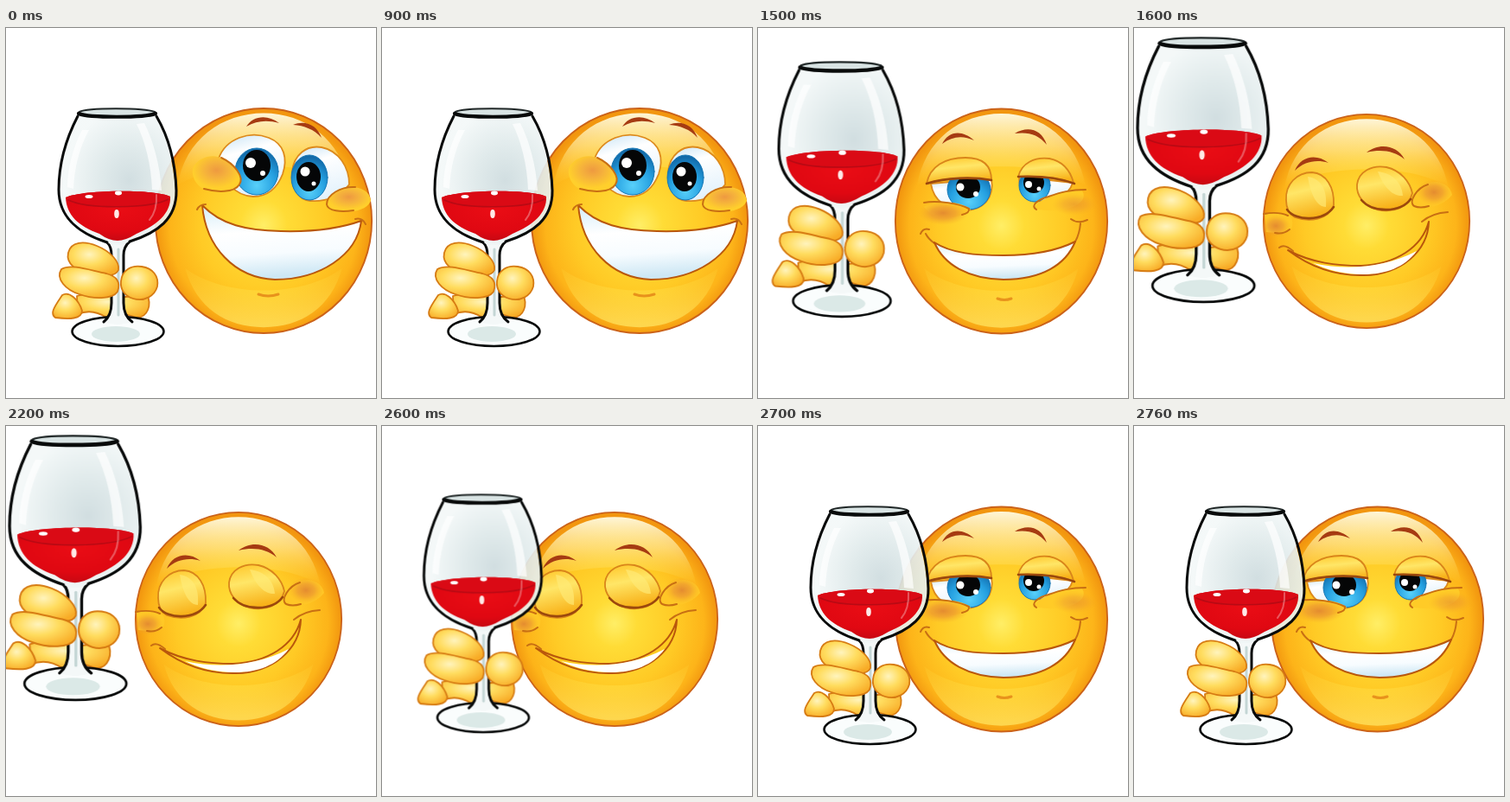
Animation, 428 px wide and 428 px high, one loop 2800 ms. Source, as an HTML page:

```html
<!DOCTYPE html>
<html lang="en">
<head>
<meta charset="utf-8">
<title>Cheers</title>
<style>
  html, body { margin: 0; width: 100%; height: 100%; overflow: hidden; background: #fff; }
  svg { display: block; width: 100%; height: 100%; }
  path, ellipse { stroke-linecap: round; stroke-linejoin: round; }

  .brow { fill: #a63b12; }
  .eye { fill: url(#eyeWhite); stroke: #dd8a1c; stroke-width: 1.8; }
  .iris { fill: url(#iris); stroke: #1677b5; stroke-width: 1; }
  .pupil { fill: #050607; }
  .shine { fill: #fff; }
  .lid { fill: url(#lid); stroke: #d9851a; stroke-width: 1.8; }
  .lash { fill: none; stroke: #9b480d; stroke-width: 2.6; }
  .cheek { fill: url(#cheek); }
  .blush { fill: url(#blush); }
  .crease { fill: none; stroke: #c86f13; stroke-width: 2; }
  .smile { fill: url(#teeth); stroke: #b9570c; stroke-width: 2; }
  .chin { fill: none; stroke: #e8921c; stroke-width: 3; }
  .finger { fill: url(#finger); stroke: #d67b13; stroke-width: 1.8; }
  .ink { fill: none; stroke: #080a0a; stroke-width: 3; }

  #glass, .face { animation: 2.8s step-end infinite; }
  #glass { animation-name: toast; }
  .face { visibility: hidden; }
  #awake { animation-name: awake; }
  #sleepy { animation-name: sleepy; }
  #content { animation-name: content; }

  @keyframes toast {
    0% { transform: none; }
    53.5714% { transform: translate(-40.9px, -60.6px) scale(1.065, 1.072); }
    57.1428% { transform: translate(-63.7px, -92.3px) scale(1.112); }
    92.8571% { transform: translate(-12.5px, -13.8px); }
    96.4285%, 100% { transform: none; }
  }
  @keyframes awake {
    0% { visibility: visible; }
    53.5714%, 100% { visibility: hidden; }
  }
  @keyframes sleepy {
    0% { visibility: hidden; }
    53.5714% { visibility: visible; }
    57.1428% { visibility: hidden; }
    96.4285%, 100% { visibility: visible; }
  }
  @keyframes content {
    0% { visibility: hidden; }
    57.1428% { visibility: visible; }
    96.4285%, 100% { visibility: hidden; }
  }
</style>
</head>
<body>
<svg viewBox="0 0 428 428">
  <defs>
    <radialGradient id="skin" cx=".5" cy=".52" r=".5">
      <stop offset="0" stop-color="#ffee66"/>
      <stop offset=".22" stop-color="#ffdc36"/>
      <stop offset=".6" stop-color="#ffca25"/>
      <stop offset=".87" stop-color="#fdb419"/>
      <stop offset="1" stop-color="#f2960f"/>
    </radialGradient>
    <linearGradient id="gloss" x2="0" y2="1">
      <stop offset="0" stop-color="#fffbe2" stop-opacity=".95"/>
      <stop offset=".45" stop-color="#fff0a8" stop-opacity=".6"/>
      <stop offset="1" stop-color="#ffe14d" stop-opacity="0"/>
    </linearGradient>
    <linearGradient id="glow" x2="0" y2="1">
      <stop offset="0" stop-color="#ffe548" stop-opacity=".1"/>
      <stop offset="1" stop-color="#ffe968" stop-opacity=".7"/>
    </linearGradient>
    <linearGradient id="eyeWhite" x2=".3" y2="1">
      <stop offset="0" stop-color="#c5e2f5"/>
      <stop offset=".35" stop-color="#fff"/>
      <stop offset="1" stop-color="#e4f2fc"/>
    </linearGradient>
    <radialGradient id="iris" cy=".8" r=".75">
      <stop offset="0" stop-color="#58d0fa"/>
      <stop offset=".6" stop-color="#249fe0"/>
      <stop offset="1" stop-color="#126aa9"/>
    </radialGradient>
    <linearGradient id="lid" x2=".25" y2="1">
      <stop offset="0" stop-color="#ffc425"/>
      <stop offset=".45" stop-color="#ffe667"/>
      <stop offset="1" stop-color="#f8b21a"/>
    </linearGradient>
    <radialGradient id="cheek" cy=".4">
      <stop offset="0" stop-color="#ee9a40"/>
      <stop offset=".45" stop-color="#f5b13c"/>
      <stop offset="1" stop-color="#ffcf2c"/>
    </radialGradient>
    <radialGradient id="blush">
      <stop offset="0" stop-color="#df8131" stop-opacity=".85"/>
      <stop offset=".5" stop-color="#e99032" stop-opacity=".6"/>
      <stop offset="1" stop-color="#f5a825" stop-opacity="0"/>
    </radialGradient>
    <linearGradient id="teeth" x2=".15" y2="1">
      <stop offset="0" stop-color="#d5edf8"/>
      <stop offset=".4" stop-color="#fff"/>
      <stop offset=".7" stop-color="#f7fcff"/>
      <stop offset="1" stop-color="#cde7f4"/>
    </linearGradient>
    <radialGradient id="finger" cx=".42" cy=".36" r=".7">
      <stop offset="0" stop-color="#fff4bd"/>
      <stop offset=".45" stop-color="#ffdc5e"/>
      <stop offset="1" stop-color="#f8ab26"/>
    </radialGradient>
    <radialGradient id="crystal" cx=".6" cy=".5" r=".55">
      <stop offset="0" stop-color="#cddbde"/>
      <stop offset=".45" stop-color="#dde8e9"/>
      <stop offset="1" stop-color="#f3f8f8"/>
    </radialGradient>
    <radialGradient id="wine" cx=".5" cy=".35" r=".65">
      <stop offset="0" stop-color="#ea0d15"/>
      <stop offset=".7" stop-color="#e00812"/>
      <stop offset="1" stop-color="#c80813"/>
    </radialGradient>

    <g id="head">
      <ellipse rx="99.3" ry="99.3" fill="url(#skin)" stroke="#cb6219" stroke-width="1.5"/>
      <path d="M-79 -31C-72 -72-38 -95 0 -95C38 -95 71 -72 79 -31C48 -54-45 -54-79 -31Z" fill="url(#gloss)"/>
      <path d="M-72 42C-35 68 35 68 72 42C62 77 34 94 0 94C-34 94-62 77-72 42Z" fill="url(#glow)"/>
    </g>
  </defs>

  <g id="awake" class="face">
    <use href="#head" transform="translate(298 223) scale(1.26 1.31)"/>
    <path class="brow" d="M278 114C285 102 302 99 316 110C302 106 290 107 278 114Z"/>
    <path class="brow" d="M332 112C347 106 360 113 365 127C356 117 345 113 332 112Z"/>
    <path class="eye" d="M246 151C254 128 282 118 304 127C322 134 326 151 320 169C313 187 302 195 286 195C264 194 250 176 246 151Z"/>
    <path class="eye" d="M331 166C333 147 347 135 365 138C385 142 397 161 397 181C386 195 370 201 352 200C337 199 330 184 331 166Z"/>
    <ellipse class="iris" cx="290" cy="166" rx="25" ry="27"/>
    <ellipse class="pupil" cx="290" cy="159" rx="16" ry="18"/>
    <circle class="shine" cx="283" cy="156" r="6"/>
    <circle class="shine" cx="297" cy="168" r="3"/>
    <ellipse class="iris" cx="351" cy="173" rx="21" ry="26"/>
    <ellipse class="pupil" cx="350" cy="172" rx="14" ry="17"/>
    <circle class="shine" cx="346" cy="166" r="5.5"/>
    <circle class="shine" cx="356" cy="180" r="2.5"/>
    <path class="cheek" d="M217 160C225 148 241 145 252 152C265 160 275 172 270 181C264 191 239 191 225 184C217 178 214 168 217 160Z"/>
    <path class="crease" d="M249 150C264 157 276 172 270 181C264 191 243 190 229 186"/>
    <path class="cheek" d="M371 205C372 194 383 185 399 184C411 184 421 189 422 200C417 212 397 214 384 212C376 211 371 209 371 205Z"/>
    <path class="crease" d="M404 184C387 183 371 193 371 204C372 212 388 213 402 211"/>
    <path class="smile" d="M227 205C249 228 278 234 318 235C355 236 386 232 411 223C406 263 363 291 311 291C264 289 231 253 227 205Z"/>
    <path class="crease" d="M221 210Q224 204 231 204M404 221Q412 219 416 227"/>
    <path class="chin" d="M292 308Q303 312 315 308"/>
  </g>

  <g id="sleepy" class="face">
    <use href="#head" transform="translate(281.5 223.5) scale(1.235 1.31)"/>
    <path class="brow" d="M213 134C220 119 236 117 250 130C237 124 225 125 213 134Z"/>
    <path class="brow" d="M297 122C312 113 328 117 334 135C324 123 313 120 297 122Z"/>
    <path class="eye" d="M200 180L270 174C274 197 260 211 239 211C219 211 203 200 200 180Z"/>
    <path class="eye" d="M302 172L364 179C360 194 340 202 321 200C307 198 302 187 302 172Z"/>
    <ellipse class="iris" cx="244" cy="187" rx="25" ry="23"/>
    <ellipse class="pupil" cx="243" cy="184" rx="14" ry="13"/>
    <circle class="shine" cx="234" cy="184" r="4.5"/>
    <circle class="shine" cx="252" cy="192" r="3"/>
    <ellipse class="iris" cx="320" cy="182" rx="18" ry="19"/>
    <ellipse class="pupil" cx="319" cy="179" rx="12" ry="12"/>
    <circle class="shine" cx="313" cy="181" r="4"/>
    <circle class="shine" cx="325" cy="186" r="2.5"/>
    <path class="lid" d="M195 180C199 160 216 150 240 150C260 150 270 159 270 176C248 172 218 173 195 180Z"/>
    <path class="lid" d="M301 172C305 156 320 149 337 151C352 154 361 164 365 179C345 173 323 171 301 172Z"/>
    <path class="lash" d="M195 180C218 173 248 172 270 176M301 172C325 171 350 174 366 180"/>
    <path fill="#ffc926" d="M192 207C207 198 237 201 246 210C238 220 205 226 192 207Z"/>
    <ellipse class="blush" cx="214" cy="214" rx="29" ry="14"/>
    <path class="crease" d="M192 202C207 199 233 203 244 209Q245 214 236 216"/>
    <path fill="#ffcb27" d="M319 209C327 195 352 188 374 187C386 201 358 217 319 209Z"/>
    <ellipse class="blush" cx="366" cy="204" rx="26" ry="13" opacity=".6"/>
    <path class="crease" d="M322 210C314 205 325 198 336 195C350 190 361 187 379 187"/>
    <path class="crease" d="M188 238Q191 231 198 233M194 238Q197 244 204 249M362 221Q370 227 381 222M373 226Q372 238 367 247"/>
    <path class="smile" d="M204 248C224 261 252 263 284 263C318 263 347 257 367 247C356 274 328 291 284 291C243 290 215 274 204 248Z"/>
    <path class="chin" d="M277 313Q285 316 293 313"/>
  </g>

  <g id="content" class="face">
    <use href="#head" transform="translate(269 223.5) scale(1.2 1.245)"/>
    <path class="brow" d="M186 165C193 148 211 145 225 156C211 152 198 154 186 165Z"/>
    <path class="brow" d="M269 144C284 132 305 136 313 152C301 142 286 140 269 144Z"/>
    <path class="lid" d="M176 199C175 181 188 167 206 167C222 168 232 184 231 205C225 222 203 225 186 219C179 215 176 208 176 199Z"/>
    <path class="lid" d="M258 181C260 166 275 158 292 161C309 165 319 178 322 191C318 208 300 214 281 210C266 206 257 194 258 181Z"/>
    <path fill="#ffeb78" opacity=".65" d="M201 172C216 174 224 187 222 207C211 207 204 191 201 172ZM282 166C299 168 310 179 311 194C298 195 288 182 282 166Z"/>
    <path class="lash" d="M177 210C187 224 219 224 231 207M263 199C276 214 308 214 320 198"/>
    <path fill="#ffc826" d="M151 216Q170 211 182 219Q187 233 174 238L153 236Z"/>
    <ellipse class="blush" cx="164" cy="229" rx="17" ry="13"/>
    <path class="crease" d="M150 215Q167 212 178 217M180 233Q173 239 163 237"/>
    <path fill="#ffc626" d="M322 202C324 189 335 178 350 178Q365 180 368 193Q354 211 322 207Z"/>
    <ellipse class="blush" cx="347" cy="190" rx="20" ry="15"/>
    <path class="crease" d="M340 181C327 185 317 201 324 206Q331 209 341 206"/>
    <path class="smile" d="M178 257C206 272 235 275 263 275C303 273 333 254 341 224C340 258 309 285 266 286C232 287 202 275 178 257Z" style="fill:#ffcb20"/>
    <path fill="#fff" d="M207 272C247 281 290 277 327 258C313 277 291 285 265 285C242 285 221 279 207 272Z"/>
    <path class="crease" d="M168 254Q174 249 184 258M333 224Q345 214 363 213"/>
  </g>

  <g id="glass">
    <path class="finger" d="M82 310Q107 302 130 312L163 308C169 320 164 335 151 335L132 329L116 335Q100 324 83 331Z"/>
    <path class="finger" d="M65 309C73 304 84 314 88 327C88 337 73 337 57 335C50 330 57 321 65 309Z"/>

    <ellipse cx="129.5" cy="351" rx="53" ry="17" fill="#fafdfd"/>
    <ellipse cx="127" cy="354" rx="28" ry="9" fill="#dbe9e7"/>
    <ellipse class="ink" cx="129.5" cy="351" rx="53" ry="17" style="stroke-width:2.5"/>
    <path fill="#f4f8f8" d="M117 247Q122 252 122 263V318Q122 333 113 340Q129 346 146 340Q136 333 136 318V263Q137 252 143 247Z"/>
    <path class="ink" d="M117 248Q122 253 122 263V318Q122 333 113 340M143 247Q136 253 136 263V318Q136 333 146 340"/>
    <path fill="none" stroke="#c4d6d5" stroke-width="3" d="M130 256V332"/>

    <path class="finger" d="M72 260C75 247 90 246 105 252C120 258 132 270 130 280C126 289 111 286 98 284C82 282 69 273 72 260Z"/>
    <path class="finger" d="M64 279C76 272 99 281 116 284C128 287 133 294 129 305C123 314 101 314 85 308C69 303 57 290 64 279Z"/>
    <path class="finger" d="M133 293C134 281 144 274 157 276C170 278 177 287 175 299C172 310 160 317 147 313C137 310 132 302 133 293Z"/>

    <path fill="url(#crystal)" fill-opacity=".91" d="M85 101C72 127 62 157 62 187C62 222 86 239 115 247Q129 256 144 246C177 235 196 220 196 188C194 156 186 126 172 101Z"/>
    <path fill="#fff" opacity=".7" d="M151 111C161 131 168 158 169 187L180 188C178 157 170 130 160 110ZM88 118C77 139 71 164 71 184L78 186C79 161 85 138 96 118Z"/>
    <path fill="url(#wine)" d="M69 196C88 187 172 186 190 195C191 214 175 228 151 238Q138 246 129 246Q119 246 108 238C83 229 70 216 69 196Z"/>
    <path fill="#da0a15" d="M69 196C88 187 172 186 190 195C174 211 85 211 69 196Z"/>
    <path fill="none" stroke="#b80a14" stroke-width="1.5" d="M72 199C95 210 166 209 188 198"/>
    <path fill="none" stroke="#f4a5a9" stroke-width="2" opacity=".5" d="M174 193Q175 211 166 222"/>
    <ellipse class="shine" cx="96" cy="195" rx="4.500" ry="2"/>
    <ellipse class="shine" cx="130" cy="191" rx="4" ry="2.4"/>
    <ellipse cx="128" cy="215" rx="2.8" ry="5" fill="#ffe9e7"/>
    <path class="ink" d="M83 102C70 127 61 157 61 187C61 221 86 238 117 248M174 102C188 126 196 156 197 188C197.500 221 175 237 143 247"/>
    <ellipse cx="128.500" cy="98" rx="44" ry="4.500" fill="#d9e4e4"/>
    <path fill="none" stroke="#202727" stroke-width="2.2" d="M85 97C94 92 159 92 172 97"/>
    <path class="ink" d="M84 99C96 104 160 104 173 99" style="stroke-width:4.200"/>
  </g>
</svg>
</body>
</html>
```
